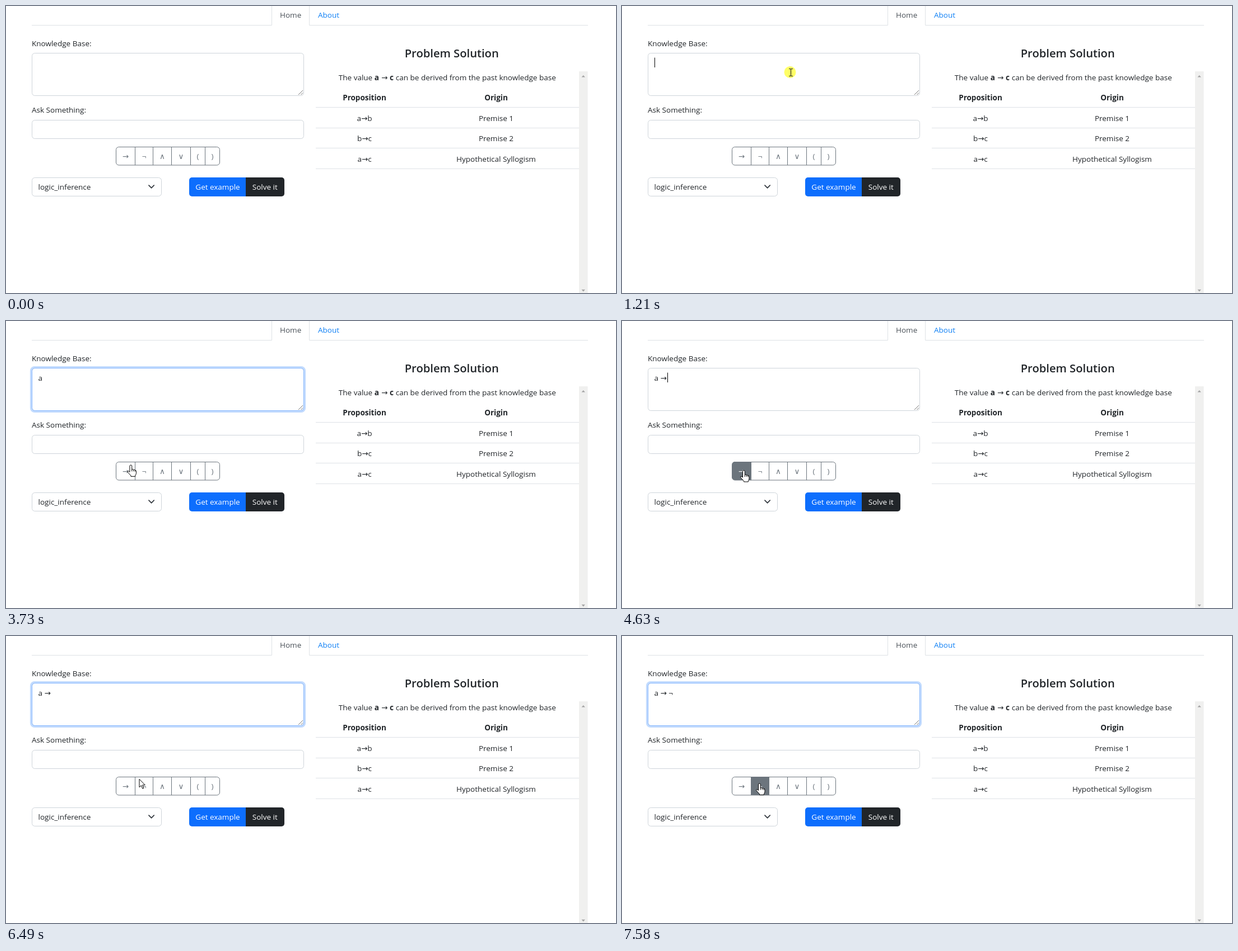
These frames come from a looping animation (1089x514 px, 8000 ms). An HTML page:

```html
<!DOCTYPE html>
<html lang="en">
<head>
<meta charset="utf-8">
<title>Logic solver</title>
<style>
html, body { margin: 0; width: 100%; height: 100%; overflow: hidden; background: #fff; }
svg { display: block; width: 1089px; height: 514px; }
text { font: 13.5px "Open Sans", "DejaVu Sans", sans-serif; fill: #212529; }
.mid { text-anchor: middle; }
.bold { font-weight: 700; }
.title { font-size: 20.2px; font-weight: 600; }
.light { fill: #fff; }
.sym { fill: #6c757d; }
.line { stroke: #dee2e6; fill: none; }
.field { stroke: #ced4da; fill: #fff; }
.group { stroke: #6c757d; fill: none; }
.pointer { fill: #fff; stroke: #000; stroke-linejoin: round; }
</style>
</head>
<body>
<svg id="stage" viewBox="0 0 1089 514">
  <path class="line" d="M46 34.5H474.5V0M541.5 0V34.5H1039"/>
  <text x="489" y="21" style="fill:#495057">Home</text>
  <text x="557" y="21" style="fill:#0d7ff5">About</text>

  <text x="46" y="72">Knowledge Base:</text>
  <rect class="field" x="46.5" y="84.5" width="485" height="76" rx="5"/>
  <g id="glow" fill="none">
    <rect x="44.7" y="82.7" width="488.6" height="79.6" rx="6.5" stroke="#c2dbfe" stroke-width="3.6"/>
    <rect x="46.5" y="84.5" width="485" height="76" rx="5" stroke="#86b7fe"/>
  </g>
  <path d="M522 159l8-8M526.5 159l3.5-3.5" stroke="#777" fill="none"/>
  <text id="typed" x="57.5" y="106.5"></text>
  <path id="caret" stroke="#000" d="M0 92.5V110"/>

  <text x="46" y="191">Ask Something:</text>
  <rect class="field" x="46.5" y="204.5" width="485" height="33" rx="5"/>
  <g id="keys"></g>

  <rect class="field" x="46.5" y="307.5" width="231" height="33" rx="5"/>
  <text x="57.5" y="329">logic_inference</text>
  <path d="M255 321.2l4.6 4.6 4.6-4.6" fill="none" stroke="#343a40" stroke-width="1.8" stroke-linecap="round" stroke-linejoin="round"/>
  <path fill="#0d6efd" d="M428 307H332a5 5 0 0 0-5 5V336a5 5 0 0 0 5 5H428Z"/>
  <path fill="#212529" d="M428 307H492a5 5 0 0 1 5 5V336a5 5 0 0 1-5 5H428Z"/>
  <text class="mid light" x="378" y="329">Get example</text>
  <text class="mid light" x="462.3" y="329">Solve it</text>

  <text class="mid title" x="795.7" y="91.5">Problem Solution</text>
  <text x="593.8" y="133.3">The value <tspan class="bold">a</tspan></text>
  <text x="670" y="133.3">→</text>
  <text class="bold" x="685" y="133.3">c</text>
  <text x="695.8" y="133.3">can be derived from the past knowledge base</text>
  <rect id="rowHover" x="553" y="255" width="470" height="36" fill="#ececec"/>
  <g id="table"></g>

  <path fill="#f0f0ef" d="M1023 117H1038.5V514H1023Z"/>
  <path fill="#a3a3a3" d="M1027.5 127.5l3.2-3.6 3.2 3.6ZM1027.5 507.8l3.2 3.6 3.2-3.6Z"/>

  <g id="mouse">
    <circle id="press" cx="-1.5" cy="-.5" r="10.5" fill="#ffff66"/>
    <path id="arrow" class="pointer" d="M0 0V14.5L3.4 11.4 5.8 17 8 16 5.7 10.6H10.3Z"/>
    <path id="beam" fill="none" stroke="#222" stroke-width="1.2" d="M-3.5-6.5H-1L0-5.8 1-6.5H3.5M0-6V6M-3.5 6.5H-1L0 5.8 1 6.5H3.5"/>
    <path id="hand" class="pointer" d="M-2 12V1.5a1.9 1.9 0 0 1 3.8 0V7.5q1.8-1.2 3 .6 1.8-.8 2.7.8 2-.3 2 1.8V14q0 2.5-1.6 4.2V20H0V18.6L-5.8 12.2q-.5-2 1.3-2ZM1.8 7.5V11M4.8 8.1V11M7.5 8.9V11.4"/>
  </g>
</svg>
<script>
const LOOP = 8000;
const $ = id => document.getElementById(id);
const show = (id, on) => { $(id).style.display = on ? '' : 'none'; };

// Symbol buttons: edges and labels
const edges = [196.5, 230.5, 262.5, 295.5, 329.5, 355.5, 381.5];
const symbols = ['→', '¬', '∧', '∨', '(', ')'];
const label = (i, cls) =>
  `<text class="mid ${cls}" x="${(edges[i] + edges[i + 1]) / 2}" y="273.5">${symbols[i]}</text>`;
$('keys').innerHTML =
  symbols.map((s, i) => label(i, 'sym')).join('') +
  `<g id="key0"><path fill="#6c757d" d="M231 252H201.5a5 5 0 0 0-5 5V280a5 5 0 0 0 5 5H231Z"/>${label(0, 'light')}</g>` +
  `<g id="key1"><path fill="#6c757d" d="M230.5 252H262.5V285H230.5Z"/>${label(1, 'light')}</g>` +
  '<rect class="group" x="196.5" y="252.5" width="185" height="32.5" rx="5"/>' +
  `<path class="group" d="${edges.slice(1, -1).map(x => `M${x} 252.5V285`).join('')}"/>`;

// Proof table
const rows = [['Proposition', 'Origin'], ['a→b', 'Premise 1'], ['b→c', 'Premise 2'], ['a→c', 'Hypothetical Syllogism']];
$('table').innerHTML = rows.map(([left, right], i) => {
  const y = 169 + i * 36.5, cls = i ? 'mid' : 'mid bold';
  return `<text class="${cls}" x="640" y="${y}">${left}</text><text class="${cls}" x="875" y="${y}">${right}</text>` +
    `<path class="line" d="M553 ${Math.round(y + 12) + .5}H1023"/>`;
}).join('');

// Mouse moves: start, end, steps, from, to, ease-out power
const moves = [
  [140, 320, 4, [660, 510], [585, 276], 1],
  [600, 1010, 7, [585, 276], [301.5, 119], 1.3],
  [3240, 3870, 10, [301.5, 119], [217.5, 268], 1.7],
  [5160, 5430, 5, [217.5, 268], [223, 240], 1.3],
  [6120, 6690, 9, [223, 240], [245.5, 264.5], 1]
];
// Caret: on, off, x
const carets = [
  [1210, 1750, 58.5], [2010, 2610, 65.5], [2680, 3240, 68.5], [3800, 4340, 68.5],
  [4630, 5160, 81.5], [5570, 6120, 84.5], [6650, 6750, 84.5], [7060, 7580, 94.5]
];
const typing = [[2010, 'a'], [4630, 'a →'], [7060, 'a → ¬']];
const presses = [[1210, 1420], [4340, 4630], [6750, 7060]];
const focus = [[1210, 4340], [4630, 6750], [7060, 9000]];
const hover = [[[3730, 5290]], [[6550, 9000]]];

const active = (spans, t) => spans.find(([on, off]) => t >= on && t < off);
const ramp = (t, start) => Math.max(0, Math.min(1, Math.floor((t - start) / 65) / 2));
const level = (spans, t) => spans.reduce((sum, [on, off]) => sum + ramp(t, on) - ramp(t, off), 0);

function mouseAt(t) {
  const move = moves.filter(m => t >= m[0]).pop();
  if (!move) return null;
  const [start, end, steps, from, to, power] = move;
  const step = Math.min(steps, Math.floor((t - start) / (end - start) * (steps - 1) + 1e-6) + 1);
  const u = 1 - (1 - step / steps) ** power;
  return from.map((v, i) => v + (to[i] - v) * u);
}

function pointerKind(x, y, t) {
  if (active([...hover[0], ...hover[1]], t)) return 'hand';
  const inField = x > 46 && x < 532 && ((y > 84 && y < 161) || (y > 204 && y < 238));
  return inField ? 'beam' : 'arrow';
}

function draw(t) {
  const pos = mouseAt(t);
  show('mouse', pos);
  if (pos) {
    const [x, y] = pos, kind = pointerKind(x, y, t);
    $('mouse').setAttribute('transform', `translate(${x} ${y})`);
    ['arrow', 'beam', 'hand'].forEach(k => show(k, k === kind));
    show('press', active(presses, t));
  }
  show('rowHover', pos && pos[0] > 553 && pos[1] > 255 && pos[1] < 291);

  const caret = active(carets, t);
  show('caret', caret);
  if (caret) $('caret').setAttribute('transform', `translate(${caret[2]})`);

  const entry = typing.filter(e => t >= e[0]).pop();
  $('typed').textContent = entry ? entry[1] : '';
  $('glow').style.opacity = level(focus, t);
  hover.forEach((spans, i) => { $('key' + i).style.opacity = level(spans, t); });
}

const begin = performance.now();
function tick() {
  draw((performance.now() - begin) % LOOP);
  requestAnimationFrame(tick);
}
tick();
</script>
</body>
</html>
```
